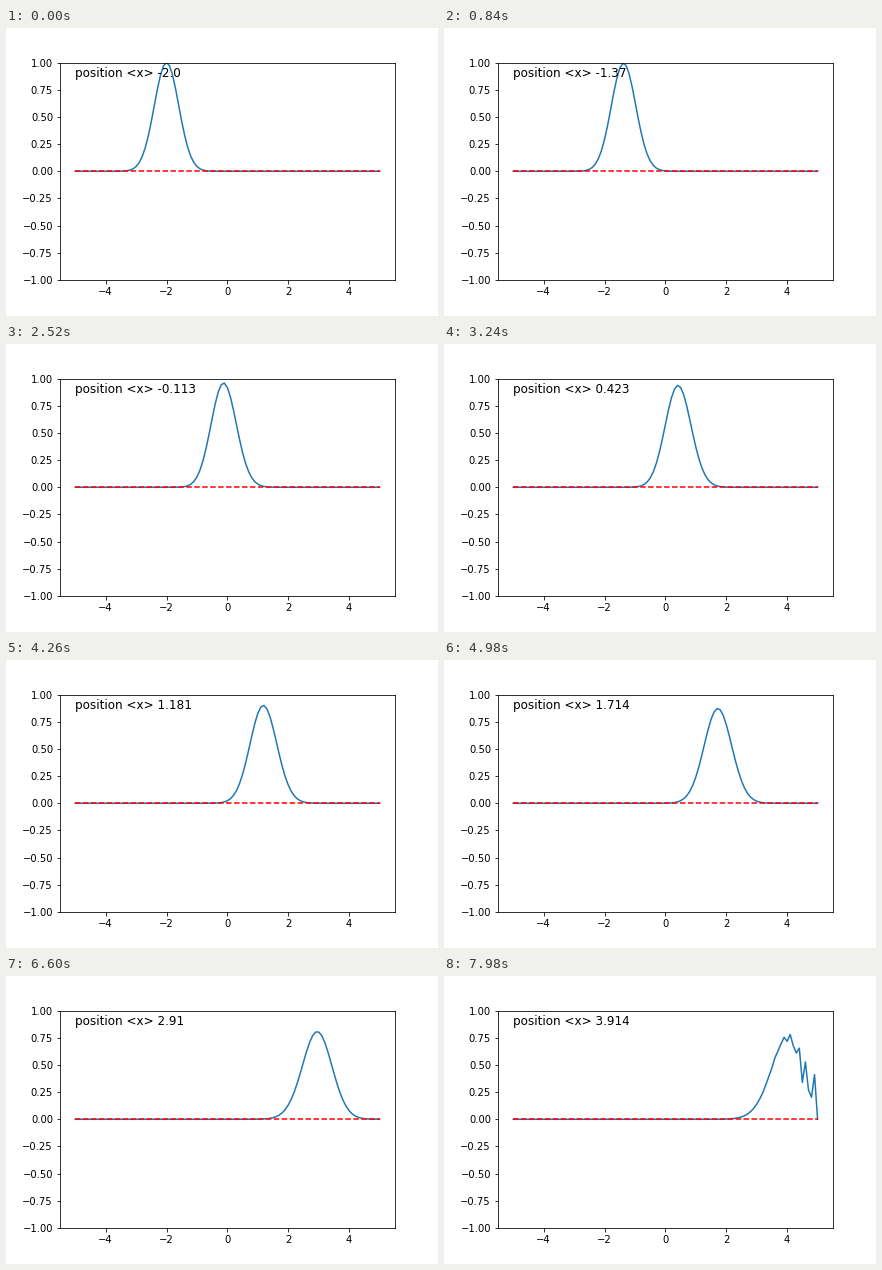
Recreate the animation shown at these times as a matplotlib script. Size 432 by 288 pixels, loop 8 s.

```python
import numpy as np
import matplotlib.pyplot as plt
from matplotlib.animation import FuncAnimation

# Wave packet in a box with hard walls, on a finite-difference grid
CELLS = 100
STEPS = 134
HOLD = 3          # ticks of 20 ms per time step
TICKS = 400
DT = 0.005
X0, SIGMA, K0 = -2.0, 0.4, 11.318
LOSS = 9.2e-5     # norm lost per step

x = np.linspace(-5, 5, CELLS + 1)
dx = x[1] - x[0]

# Eigenmodes and energies of the discrete Laplacian
mode = np.arange(1, CELLS)
basis = np.sin(np.pi * np.outer(np.arange(CELLS + 1), mode) / CELLS)
energy = (1 - np.cos(np.pi * mode / CELLS)) / dx**2

psi0 = np.exp(-(x - X0) ** 2 / (4 * SIGMA**2) + 1j * K0 * x)
coef = basis.T @ psi0 * 2 / CELLS
norm0 = np.sum(np.abs(psi0) ** 2)


def density(step):
    psi = basis @ (coef * np.exp(-1j * energy * DT * step))
    return np.abs(psi) ** 2 * (1 - LOSS * step)


densities = [density(step) for step in range(STEPS)]
means = [float(np.sum(x * rho) / norm0) for rho in densities]

plt.rcParams["font.family"] = "DejaVu Sans"
fig, ax = plt.subplots(figsize=(6, 4), dpi=72, facecolor="white")
fig.subplots_adjust(left=0.125, right=0.9, bottom=0.125, top=0.88)
ax.set_xlim(-5.5, 5.5)
ax.set_ylim(-1, 1)

curve, = ax.plot(x, densities[0], color="C0", lw=1.5)
potential, = ax.plot(x, np.zeros_like(x), "r--", lw=1.5)
label = ax.text(-5, 0.867, "", fontsize=12)


def update(tick):
    step = tick // HOLD
    curve.set_ydata(densities[step])
    label.set_text(f"position <x> {round(means[step], 3)}")
    return curve, potential, label


def init():
    return update(0)


anim = FuncAnimation(fig, update, frames=TICKS, init_func=init,
                     interval=20, repeat=True, repeat_delay=0, blit=True)
plt.show()
```
